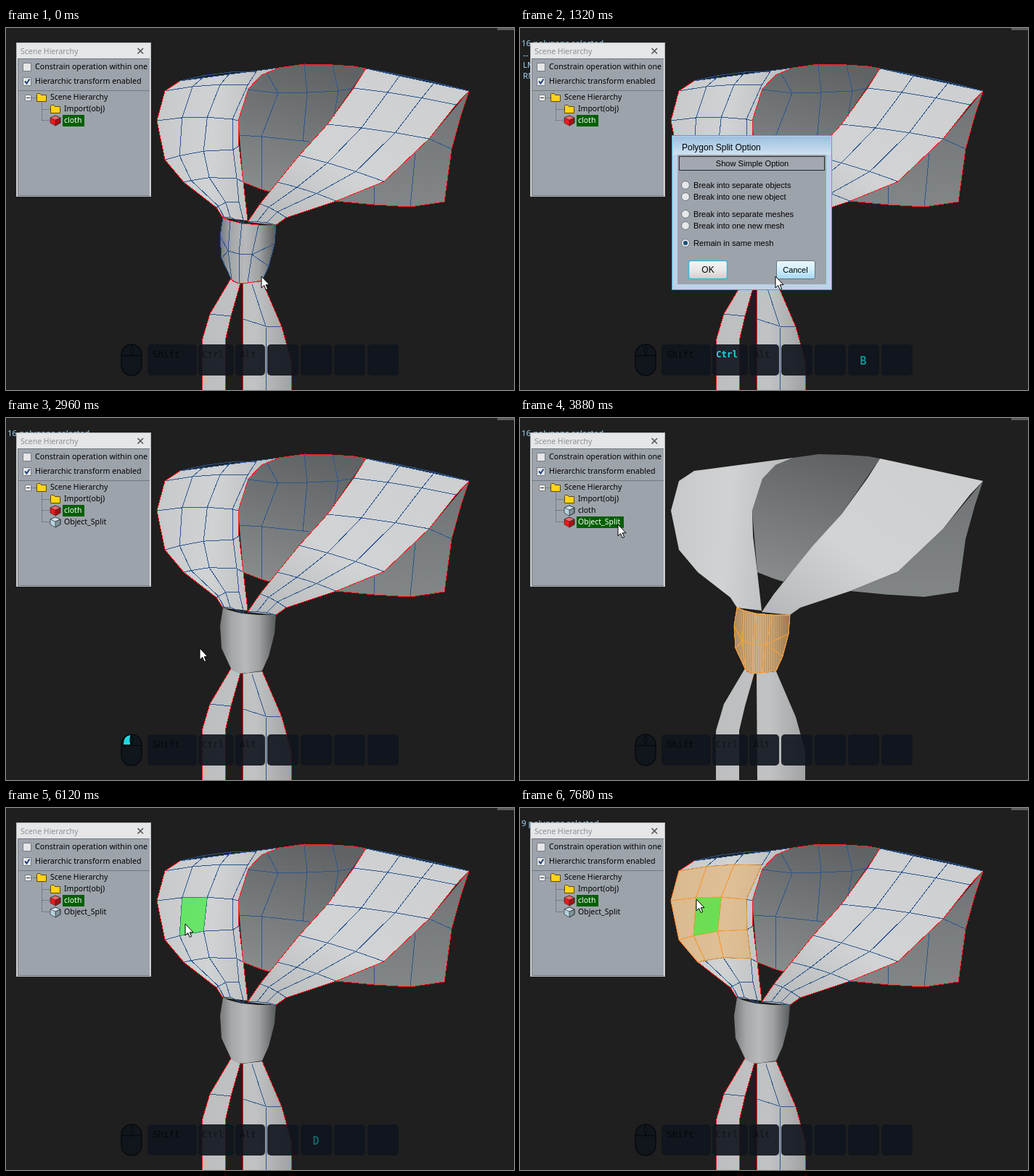
Recreate the animation shown at these times as an HTML page. Size 700 by 500 pixels, loop 8 s.

```html
<!DOCTYPE html>
<html lang="en">
<head>
<meta charset="utf-8">
<title>Splitting a mesh</title>
<style>
  html, body { margin: 0; height: 100%; overflow: hidden; background: #1f1f1f; }
  svg { display: block; width: 700px; height: 500px; }
  text { white-space: pre; }
  .ui { font: 10.5px "Noto Sans", sans-serif; }
  .wide { font-size: 10.65px; }
  .status { font: 500 11.5px "Noto Sans", sans-serif; fill: #9fd4f2; }
  .dialog { font: 11.1px "Liberation Sans", Arial, sans-serif; }
  .keys { font: 12.5px "DejaVu Sans Mono", monospace; fill: #04070a; }
  .key { font: bold 15px "DejaVu Sans Mono", monospace; fill: #1cd9de; text-anchor: middle; }
  .wire, .border, .pickedWire { fill: none; shape-rendering: crispEdges; }
  .wire { stroke: #2b568f; }
  .border { stroke: #ff1c1c; }
  .pickedWire { stroke: #f9a13a; }
  .picked { fill: rgba(243, 165, 65, .42); stroke: #f9a13a; }
  .dots { stroke: #555b63; stroke-dasharray: 1 1; }
</style>
</head>
<body>
<svg viewBox="0 0 700 500">
  <defs>
    <linearGradient id="flapL" x2="1" y2=".1"><stop stop-color="#c6c8c9"/><stop offset=".5" stop-color="#d0d2d3"/><stop offset="1" stop-color="#b7b9ba"/></linearGradient>
    <linearGradient id="flapR" x1="1" x2="0" y2="1"><stop stop-color="#cccecf"/><stop offset=".6" stop-color="#d1d3d4"/><stop offset="1" stop-color="#b4b6b7"/></linearGradient>
    <linearGradient id="inside" x1=".6" x2=".3" y2="1"><stop stop-color="#606365"/><stop offset="1" stop-color="#888b8c"/></linearGradient>
    <linearGradient id="behind" x2="0" y2="1"><stop stop-color="#707375"/><stop offset="1" stop-color="#828687"/></linearGradient>
    <linearGradient id="knotFill"><stop stop-color="#76787a"/><stop offset=".2" stop-color="#a4a6a7"/><stop offset=".45" stop-color="#b7b9ba"/><stop offset=".7" stop-color="#9fa1a2"/><stop offset="1" stop-color="#585b5d"/></linearGradient>
    <linearGradient id="tailFill"><stop stop-color="#bcbebf"/><stop offset=".6" stop-color="#c0c2c3"/><stop offset="1" stop-color="#a0a2a3"/></linearGradient>
    <linearGradient id="bar" x2="0" y2="1"><stop stop-color="#9cc0de"/><stop offset="1" stop-color="#cfe2f2"/></linearGradient>
    <linearGradient id="button" x2="0" y2="1"><stop stop-color="#f4f4f4"/><stop offset=".5" stop-color="#e8e8e8"/><stop offset="1" stop-color="#cfcfcf"/></linearGradient>
    <linearGradient id="buttonHot" x2="0" y2="1"><stop stop-color="#eaf6fd"/><stop offset=".5" stop-color="#d2eefc"/><stop offset="1" stop-color="#a4d9f4"/></linearGradient>
    <pattern id="stripes" width="3" height="6" patternUnits="userSpaceOnUse"><path d="M.5 0V6" stroke="#b87a30" stroke-opacity=".45"/></pattern>
    <path id="folder" d="M.5 1.500Q.5 .5 1.500 .5H5L6.500 2.500H13.500V11.500H.5Z" fill="#ffd21a" stroke="#5e4a00"/>
    <g id="cube" stroke="#333" stroke-width=".7">
      <path d="M0 3L7 0 14 3V10L7 14 0 10Z"/><path d="M7 6L14 3V10L7 14Z" fill="#000" fill-opacity=".3"/><path d="M0 3L7 0 14 3 7 6Z" fill="#fff" fill-opacity=".35"/>
    </g>
  </defs>

  <rect width="700" height="500" fill="#1f1f1f"/>
  <rect x="677" width="23" height="3" fill="#5c5c5c"/>

  <path id="tails" fill="url(#tailFill)"/>
  <path id="back" fill="url(#inside)"/>
  <path id="fold" fill="url(#behind)"/>
  <path id="left" fill="url(#flapL)"/>
  <path id="right" fill="url(#flapR)"/>
  <path id="knot" fill="url(#knotFill)"/>
  <g id="clothLines"><path id="clothWire" class="wire"/><path id="clothBorder" class="border"/></g>
  <g id="knotLines"><path id="knotWire" class="wire"/><path id="knotBorder" class="border"/></g>
  <path id="corner" class="picked" d="M339 313L362 330 352 348 333 352Z"/>
  <g id="knotPicked"><path id="knotTint" class="picked"/><path id="knotStripes" fill="url(#stripes)"/><path id="knotPickedWire" class="pickedWire"/></g>
  <g id="faces"></g>
  <path id="hover" fill="rgba(50,240,50,.65)"/>

  <text id="status" class="status" x="2" y="25"></text>
  <g id="hints" class="status"><text x="4" y="41">--</text><text x="4" y="55">LMB</text><text x="4" y="70">RMB</text></g>

  <g class="ui">
    <rect x="14.500" y="20.500" width="185" height="212" fill="#e4e6e8" stroke="#b4b8bb"/>
    <rect x="17" y="42" width="181" height="189" fill="#9da3ab"/>
    <path d="M17 86.500H198M17 42.500H198M16.500 42V231.500H198" fill="none" stroke="#737980"/>
    <text id="title" x="20" y="36">Scene Hierarchy</text>
    <path d="M181.500 28L189 35.500M189 28L181.500 35.500" stroke="#555" stroke-width="1.600"/>
    <path d="M23.500 48.500h11v11h-11zM23.500 68.500h11v11h-11z" fill="#e6e6e6" stroke="#777c82"/>
    <path d="M26 73.500L28.500 76.500 32.500 70.500" fill="none" stroke="#25457e" stroke-width="2"/>
    <text class="wide" x="40" y="57">Constrain operation within one</text>
    <text class="wide" x="40" y="77">Hierarchic transform enabled</text>
    <path class="dots" d="M35 96.500H42M49.500 103V128M50 112.500H61M50 127.500H61"/>
    <path d="M26.500 92.500h8v8h-8z" fill="#f4f4f4" stroke="#777c82"/><path d="M28 96.500H33" stroke="#223"/>
    <use href="#folder" x="42" y="90"/><use href="#folder" x="61" y="106"/>
    <text x="61" y="99">Scene Hierarchy</text><text x="80" y="115">Import(obj)</text>
    <g id="splitItem">
      <path class="dots" d="M49.500 128V144M50 143.500H61"/>
      <rect id="splitMark" x="78" y="136" width="65" height="16" fill="#005f00"/>
      <use id="splitCube" href="#cube" x="61" y="137"/><text id="splitName" x="80" y="147">Object_Split</text>
    </g>
    <rect id="clothMark" x="78" y="120" width="30" height="16" fill="#005f00"/>
    <use id="clothCube" href="#cube" x="61" y="121"/><text id="clothName" x="80" y="131">cloth</text>
  </g>

  <g id="dialog" class="dialog">
    <rect x="209.500" y="148.500" width="220" height="213" fill="#bcd3e9" stroke="#27b5dc"/>
    <rect x="211" y="150" width="217" height="25" fill="url(#bar)"/>
    <rect x="217" y="175" width="205" height="179" fill="#9da3ab"/>
    <rect x="219.500" y="177.500" width="200" height="19" fill="#a3a8b0" stroke="#26292d"/>
    <text x="223" y="169" font-size="12">Polygon Split Option</text>
    <text x="320" y="191" text-anchor="middle">Show Simple Option</text>
    <g id="radios"></g>
    <circle id="dot" cx="228" r="3" fill="#124f78"/>
    <rect id="ok" x="232.500" y="321.500" width="53" height="25" rx="2.500" stroke="#3cb4dc" stroke-width="1.500"/>
    <rect id="cancel" x="353.500" y="321.500" width="53" height="25" rx="2.500" stroke="#6a737b"/>
    <text x="259" y="338" text-anchor="middle" font-size="12">OK</text>
    <text x="379.500" y="338" text-anchor="middle">Cancel</text>
  </g>

  <g class="keys">
    <g id="boxes" fill="#10151d" fill-opacity=".9"></g>
    <rect x="159" y="437" width="28" height="43" rx="14" fill="#11161d" stroke="#070a0e" stroke-width="1.500"/>
    <path id="leftButton" d="M162 451Q162 439 171 438V451Z" fill="#1cd9de"/>
    <path id="rightButton" d="M175 438Q184 439 184 452H175Z" fill="#1cd9de"/>
    <path d="M159 452.500H187M173 437V452" stroke="#070a0e" stroke-width="1.500"/>
    <rect x="171" y="441" width="4" height="8" rx="2" fill="#11161d" stroke="#070a0e"/>
    <text x="202" y="455">Shift</text><text id="ctrl" x="270" y="455">Ctrl</text><text x="322" y="455" opacity=".6">Alt</text>
  </g>
  <text id="stroke" class="key" y="465"></text>

  <path id="cursor" d="M0 0V16L3.700 12.500 6.200 18.500 8.700 17.400 6.200 11.700H11Z" fill="#fff" stroke="#000"/>
</svg>

<script>
const $ = id => document.getElementById(id);
const attr = (id, name, value) => $(id).setAttribute(name, value);
const show = (id, on) => attr(id, 'opacity', +on);
const clamp = (v, min, max) => Math.min(max, Math.max(min, v));

// A flap is a sheet of three strips between two edges; lines across it bow upward.
const points = text => text.split(' ').map(p => p.split(',').map(Number));
const line = list => 'M' + list.join('L');
const side = (g, c) => g.map(row => row[c]);
function sheet(edgeA, edgeB, bow, skew) {
  return edgeA.map(([ax, ay], row) => [0, 1, 2, 3].map(c => {
    const f = (c / 3) ** skew(row), [bx, by] = edgeB[row];
    return [ax + (bx - ax) * f, ay + (by - ay) * f - bow * Math.sin(Math.PI * f)];
  }));
}
const wires = g => g.map(line).join('') + [1, 2].map(c => line(side(g, c))).join('');

const outer = points('240,73 219,87 208,128 219,182 245,213 290,248 299,262');
const crease = points('345,60 333,79 312,126 313,168 318,208 321,240 328,270');
const inner = points('376,55 352,65 334,84 320,128 321,163 327,213 333,266');
const upper = points('496,56 479,83 443,133 404,176 374,213 350,243 333,268');
const lower = points('638,87 620,106 583,153 521,212 455,239 386,262 372,272');
const leftFlap = sheet(outer, crease, 4, row => 1 + .4 * Math.max(0, row - 2));
const rightFlap = sheet(upper, lower, 2, () => 1);

const backTop = 'M376,55L411,50 450,51 480,53 496,56';
const foldEdge = 'M638,87L627,120 614,167 604,240 557,247 507,244 455,239';
const knotTop = 'M299,262L309,266 325,270 348,272 372,272';
const knotShape = knotTop + 'L370,298 362,329 353,349 333,352 321,353 311,348 297,318 295,287Z';
const knotMesh = 'M309,266L306,308 311,348M325,270L321,312 321,353M348,272L339,313 333,352' +
  'M295,287L306,308 321,312 339,313 370,298M297,318L306,308M339,313L362,329';
const tails = 'M310,346L281,395 270,432 270,500 302,500 302,432 310,398 323,352' +
  'M326,353L327,500 393,500 393,460 380,413 353,350';

attr('left', 'd', line([...outer, ...inner.toReversed()]) + 'Z');
attr('right', 'd', line([...upper, ...lower.toReversed()]) + 'Z');
attr('back', 'd', backTop + 'L443,133 363,226 350,222 327,213 320,128 334,84 352,65Z');
attr('fold', 'd', foldEdge + 'L521,212 583,153Z');
attr('tails', 'd', tails);
for (const id of ['knot', 'knotTint', 'knotStripes']) attr(id, 'd', knotShape);
for (const id of ['knotWire', 'knotPickedWire']) attr(id, 'd', knotShape + knotMesh);
attr('knotBorder', 'd', knotTop + 'M310,346L313,350 321,353 333,352 353,349');
attr('clothWire', 'd', wires(leftFlap) + wires(rightFlap) + line(crease) +
  'M240,73L376,55M312,126L320,128M313,168L321,163M318,208L327,213' +
  'M360,63L375,90 352,150 352,222M411,50L415,89 409,157M450,51L458,87 452,122' +
  'M334,85L375,90 415,89 458,87 479,83M320,148L352,150 418,157' +
  'M564,173L557,247M507,219V244M583,153L614,167M496,56L638,87' +
  'M280,395L310,398M327,402L358,412 380,413M339,354L358,412 359,500');
attr('clothBorder', 'd', [outer, inner, upper, lower].map(line).join('') +
  backTop + foldEdge + 'M327,213L350,222 363,226' + tails);

// The dragged faces: the middle one, then the ring around it.
const ringAngle = k => Math.PI * (1 - k / 4);
const face = (r, c) => line([leftFlap[r][c], leftFlap[r][c + 1], leftFlap[r + 1][c + 1], leftFlap[r + 1][c]]) + 'Z';
const faces = [face(2, 1)];
for (let k = 0; k < 8; k++)
  faces.push(face(2 + Math.round(Math.sin(ringAngle(k))), 1 + Math.round(Math.cos(ringAngle(k)))));
$('faces').innerHTML = faces.map(d => `<path class="picked" d="${d}"/>`).join('');

const radios = { 217: 'Break into separate objects', 233: 'Break into one new object',
  257: 'Break into separate meshes', 273: 'Break into one new mesh', 297: 'Remain in same mesh' };
$('radios').innerHTML = Object.entries(radios).map(([y, label]) =>
  `<circle cx="228" cy="${y}" r="5.500" fill="#e6e8ea" stroke="#70767d"/><text x="239" y="${+y + 4}">${label}</text>`).join('');
const box = (x, w) => `<rect x="${x}" y="437" width="${w}" height="43" rx="5"/>`;
$('boxes').innerHTML = box(195, 68) + box(265, 49) + box(316, 41) +
  [0, 1, 2, 3].map(i => box(360 + 46 * i, 43)).join('');

// Timeline, in milliseconds.
const LOOP = 8000, DRAG = 6360, FACE_TIME = 85;
const status = [[0, ''], [80, '1 polygons selected'], [480, '16 polygons selected'], [5120, 'Object_Split'],
  [5520, 'cloth'], [5800, ''], [7360, '9 polygons selected']];
const clicks = [80, 2080, 2880, 3480];
const strokes = [[0, ''], [1240, 'B'], [5120, 'F'], [5360, 'D']];
const strokeSteps = [80, 240, 840, 1160];
const at = (track, t) => track.findLast(([start]) => start <= t);

function ringPoint(t) {
  const angle = ringAngle(clamp((t - DRAG) / FACE_TIME - 1, 0, 7));
  const square = v => clamp(v * 1.42, -1, 1);
  return [267 + 37 * square(Math.cos(angle)), 136 + 52 * square(Math.sin(angle))];
}

// Each move: start, end, x, y.
function cursorAt(t) {
  const moves = [[1400, 2000, 316, 223], [2160, 2240, 314, 228], [2440, 2720, 274, 327], [2880, 3480, 135, 147],
    [3880, 4720, 277, 191], [5760, 6080, 247, 160], [DRAG - 80, DRAG + FACE_TIME, ...ringPoint(t)],
    [7120, 7200, 243, 94], [7440, 7640, 243, 126]];
  return moves.reduce(([x, y], [start, end, toX, toY]) => {
    const k = clamp((t - start) / (end - start), 0, 1), ease = k * k * (3 - 2 * k);
    return [x + (toX - x) * ease, y + (toY - y) * ease];
  }, [352, 343]);
}

function draw(t) {
  const between = (a, b) => t >= a && t < b;
  const [x, y] = cursorAt(t);
  attr('cursor', 'transform', `translate(${Math.round(x)} ${Math.round(y)})`);

  const split = t >= 2960, splitActive = between(3480, 5520);
  show('clothLines', !splitActive);
  show('knotLines', !split || splitActive);
  show('corner', between(80, 480));
  show('knotPicked', between(480, 2960) || between(3480, 5120));

  const visited = Math.min(8, Math.floor((t - DRAG) / FACE_TIME));
  [...$('faces').children].forEach((el, i) => el.setAttribute('opacity', +(i <= visited)));
  const hover = between(5800, 5960) ? 3 : between(DRAG, 7520) ? visited : 0;
  attr('hover', 'd', t < 5800 ? '' : faces[hover]);

  $('status').textContent = at(status, t)[1];
  show('hints', between(1040, 2960));
  attr('title', 'fill', between(3480, 3880) ? '#111' : '#8d9197');
  show('splitItem', split);
  for (const [name, active] of [['cloth', !splitActive], ['split', splitActive]]) {
    show(name + 'Mark', active);
    attr(name + 'Cube', 'fill', active ? '#f01818' : '#b4d3df');
    attr(name + 'Name', 'fill', active ? '#fff' : '#000');
  }

  show('dialog', between(1240, 2960));
  attr('dot', 'cy', t < 2080 ? 297 : 233);
  const hot = left => y >= 321 && y < 348 && x >= left && x < left + 55;
  attr('ok', 'fill', `url(#button${hot(232) ? 'Hot' : ''})`);
  attr('cancel', 'fill', `url(#button${hot(352) ? 'Hot' : ''})`);

  // A click lights the mouse button, which dims before going out.
  const clickAge = t - clicks.findLast(start => start <= t);
  attr('leftButton', 'opacity', clickAge < 240 ? 1 : clickAge < 400 ? .4 : 0);
  show('rightButton', between(DRAG, 7360));
  const ctrl = between(1040, 1480);
  attr('ctrl', 'fill', ctrl ? '#1cd9de' : '#04070a');
  attr('ctrl', 'opacity', ctrl ? 1 : .6);
  attr('ctrl', 'font-weight', ctrl ? 'bold' : 'normal');

  // A keystroke hops left from box to box and fades.
  const [pressed, key] = at(strokes, t);
  const slot = strokeSteps.filter(age => age <= t - pressed).length;
  $('stroke').textContent = slot < 4 ? key : '';
  attr('stroke', 'x', 519 - 46 * slot);
  attr('stroke', 'opacity', .62 ** slot);
}

const start = performance.now();
function frame() {
  draw((performance.now() - start) % LOOP);
  requestAnimationFrame(frame);
}
frame();
</script>
</body>
</html>
```
